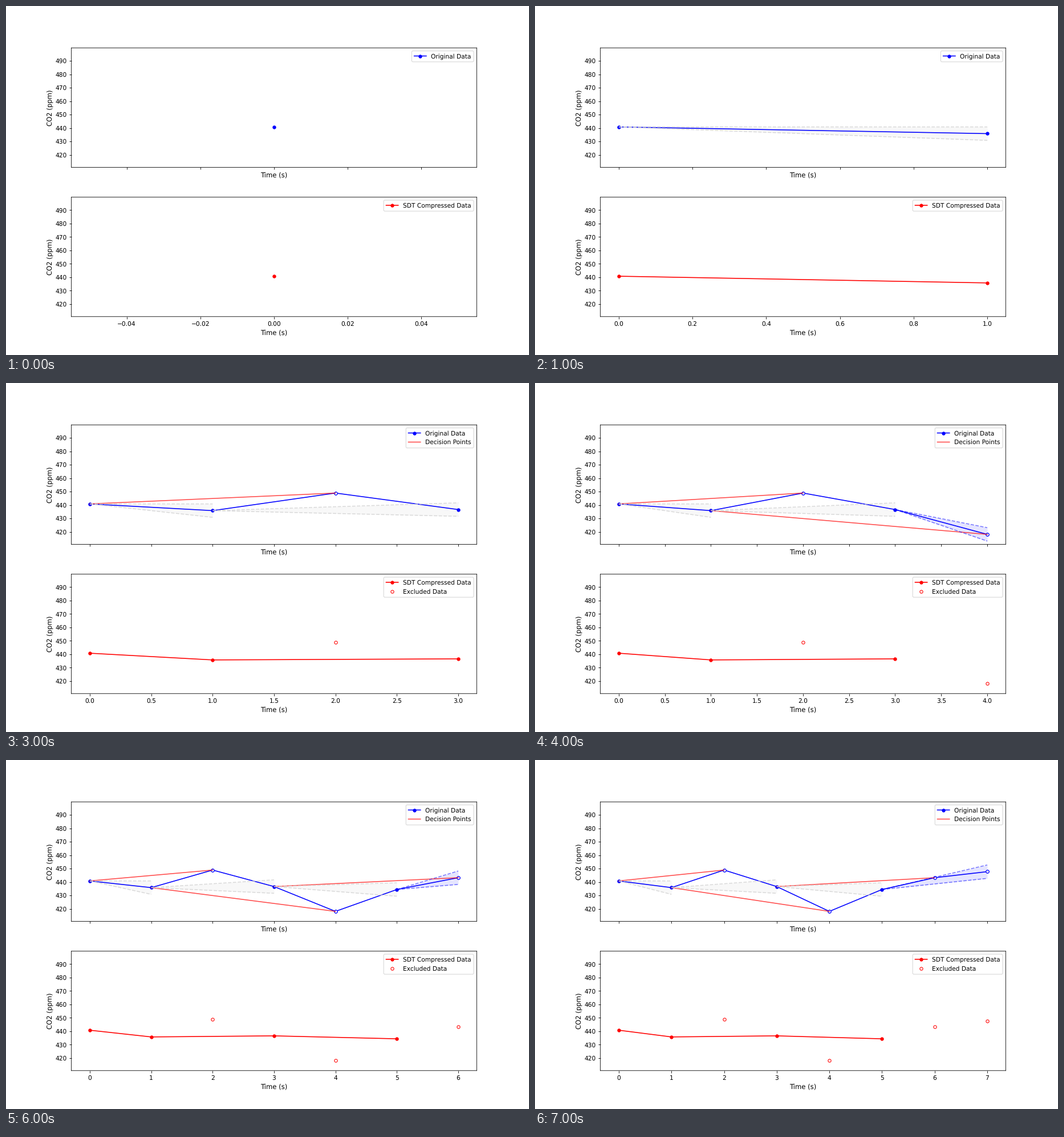
Write a matplotlib script that moves like this. It is 917 px wide and 611 px high and loops after 8000 ms.

```python
import matplotlib.pyplot as plt
from matplotlib.animation import FuncAnimation

DPI = 76.4
WIDTH, HEIGHT = 917, 611
DOOR = 5  # half-height of the corridor, in ppm

values = [440.8, 435.8, 448.9, 436.6, 418.1, 434.4, 443.2, 447.7]
kept = [0, 1, 3, 5]
decisions = [(0, 2), (1, 4), (3, 6)]

# Soft, unsnapped edges for lines and glyphs.
plt.rcParams.update({
    "font.family": "DejaVu Sans",
    "path.snap": False,
    "text.hinting": "none",
})
# The tiny surplus keeps the pixel size from rounding down.
fig, (top, bottom) = plt.subplots(
    2, 1, dpi=DPI, figsize=((WIDTH + 0.01) / DPI, (HEIGHT + 0.01) / DPI))
fig.subplots_adjust(left=0.125, right=0.9, bottom=0.11, top=0.88, hspace=0.25)


def setup(ax, now):
    ax.clear()
    if now:
        ax.set_xlim(-0.05 * now, 1.05 * now)
    else:
        ax.set_xlim(-0.055, 0.055)
    ax.set_ylim(410.7, 499.7)
    ax.set_xlabel("Time (s)", fontsize=11)
    ax.set_ylabel("CO2 (ppm)", fontsize=11)


def plot_points(ax, times, *style, **options):
    ax.plot(times, [values[t] for t in times], *style, markersize=5, **options)


def corridor(start, end, color, line_alpha, fill_alpha):
    span = [start, end]
    low = [values[start], values[end] - DOOR]
    high = [values[start], values[end] + DOOR]
    for edge in (high, low):
        top.plot(span, edge, "--", color=color, alpha=line_alpha)
    top.fill_between(span, low, high, color=color, alpha=fill_alpha,
                     linewidth=0)


def update(now):
    setup(top, now)
    setup(bottom, now)
    top.tick_params(labelbottom=False)

    seen = list(range(now + 1))
    archived = [t for t in seen if t in kept]
    excluded = [t for t in seen if t not in kept]

    plot_points(top, seen, "bo-", label="Original Data")
    plot_points(top, excluded, "bo", markerfacecolor="white")

    made = [pair for pair in decisions if pair[1] <= now]
    for i, pair in enumerate(made):
        top.plot(pair, [values[t] for t in pair], "r-", alpha=0.7,
                 label="_" if i else "Decision Points")

    for start, end in zip(archived, archived[1:]):
        corridor(start, end, "lightgray", 0.8, 0.15)
    if now not in kept:
        corridor(archived[-1], now, "blue", 0.5, 0.1)

    plot_points(bottom, archived, "ro-", label="SDT Compressed Data")
    if excluded:
        plot_points(bottom, excluded, "ro", markerfacecolor="white",
                    label="Excluded Data")

    for ax in (top, bottom):
        ax.legend(loc="upper right")
    return []


anim = FuncAnimation(fig, update, frames=len(values), init_func=lambda: [],
                     interval=1000, repeat=True, repeat_delay=0, blit=False)
plt.show()
```
